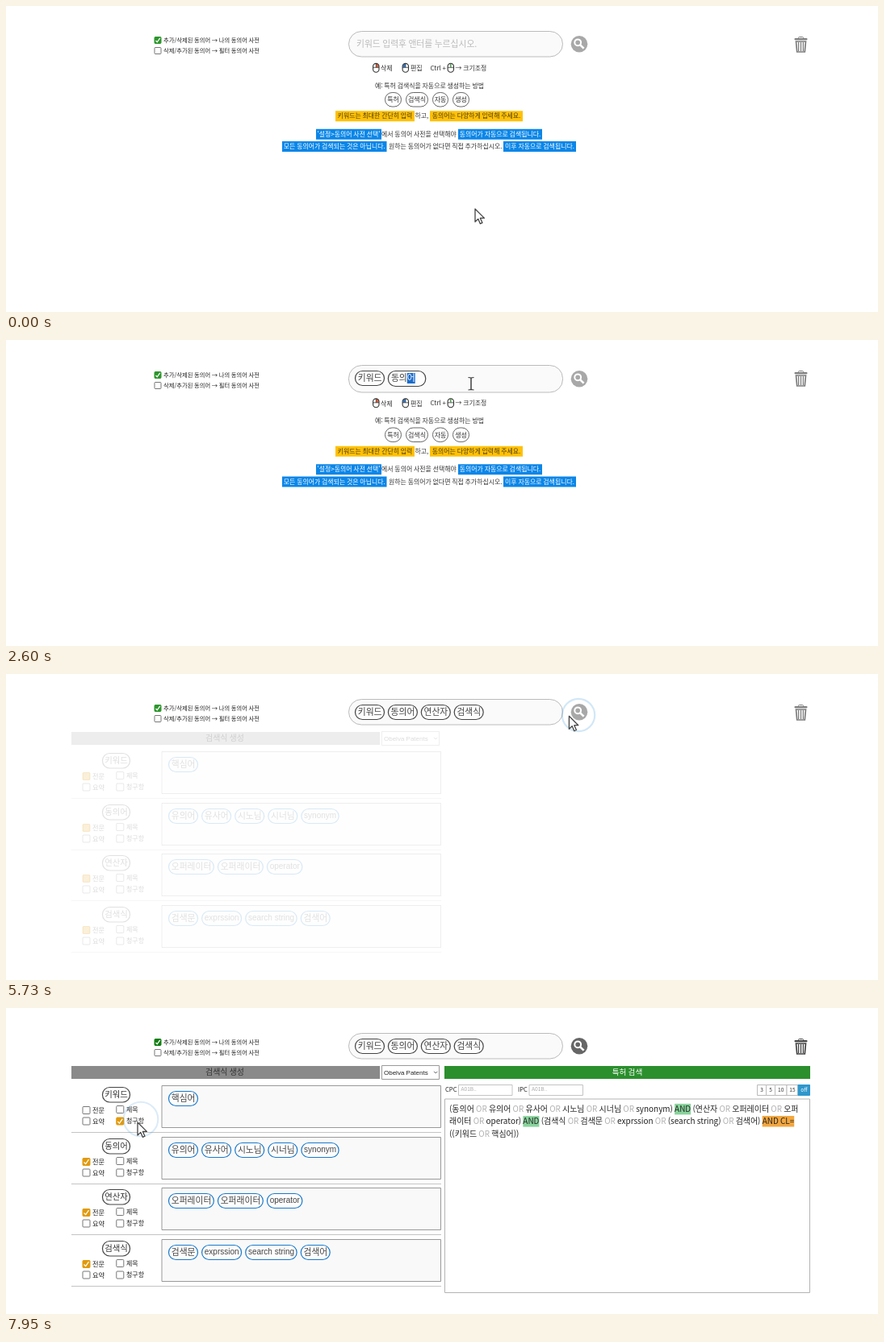
Write an HTML page with a canvas that moves like this. It is 1080 px wide and 380 px high and loops after 7990 ms.

```html
<!DOCTYPE html>
<html lang="ko">
<head>
<meta charset="utf-8">
<title>검색식 생성</title>
<style>
html, body { margin: 0; width: 100%; height: 100%; overflow: hidden; background: #fff; }
canvas { display: block; }
</style>
</head>
<body>
<canvas id="stage" width="1080" height="380"></canvas>
<script>
const ctx = document.getElementById('stage').getContext('2d');
const LOOP = 7990;
const SANS = '"Noto Sans CJK KR", "Noto Sans CJK", "Noto Sans CJK JP", "Noto Sans", sans-serif';
const ARIAL = '"Liberation Sans", "Noto Sans CJK KR", sans-serif';
const BLUE = '#0b86e8';

const PANEL_IN = 5560, RESULT_IN = 6450, FILTER_AT = 7660;

const ramp = (t, a, b) => Math.min(1, Math.max(0, (t - a) / (b - a)));
const ease = p => p * p * (3 - 2 * p);
const mix = (a, b, k) => 'rgb(' + a.map((v, i) => Math.round(v + (b[i] - v) * k)).join(',') + ')';

function setFont(size, family = SANS, weight = 400) {
  ctx.font = `${weight} ${size}px ${family}`;
}

// y is the visual middle of the line; returns the advance width
function text(s, x, y, size, color = '#333', { align = 'left', family = SANS, weight = 400 } = {}) {
  setFont(size, family, weight);
  ctx.textAlign = align;
  ctx.fillStyle = color;
  ctx.fillText(s, x, y + size * 0.37);
  return ctx.measureText(s).width;
}

function rect(x, y, w, h, fill, stroke, r = 0, line = 1) {
  ctx.beginPath();
  ctx.roundRect(x, y, w, h, r);
  if (fill) { ctx.fillStyle = fill; ctx.fill(); }
  if (stroke) { ctx.strokeStyle = stroke; ctx.lineWidth = line; ctx.stroke(); }
}

function lines(points, color, width, close) {
  ctx.beginPath();
  points.forEach(([x, y], i) => i ? ctx.lineTo(x, y) : ctx.moveTo(x, y));
  if (close) ctx.closePath();
  ctx.strokeStyle = color;
  ctx.lineWidth = width;
  ctx.stroke();
}

function checkbox(x, y, size, on) {
  rect(x + .5, y + .5, size - 1, size - 1, on || '#fff', on || '#777', 1);
  if (on) lines([[x + 2, y + size * .55], [x + size * .42, y + size * .76], [x + size * .8, y + size * .22]], '#fff', 1.3);
}

// ---- header ----

function searchIcon(x, y, color) {
  ctx.fillStyle = color;
  ctx.beginPath();
  ctx.arc(x, y, 10.3, 0, 7);
  ctx.fill();
  ctx.beginPath();
  ctx.arc(x - 1.8, y - 2, 3.9, 0, 7);
  ctx.strokeStyle = '#fff';
  ctx.lineWidth = 2;
  ctx.stroke();
  lines([[x + 1.2, y + 1], [x + 5.6, y + 5.4]], '#fff', 2.6);
}

function trash(color) {
  rect(976.5, 40, 16, 2.2, color, null, 1);
  rect(981.5, 38.5, 6, 2, null, color, 1, 1);
  lines([[978.5, 44], [979.7, 57], [989.3, 57], [990.5, 44]], color, 1.7, true);
  for (const x of [981.6, 984.5, 987.4]) lines([[x, 45], [x, 56]], color, 1.3);
}

const WORDS = [
  { text: '키워드', start: 1580, last: 2040, enter: 2120, steps: 'ㅋ 키 킹 키우 키워 키웓 키워드' },
  { text: '동의어', start: 2160, last: 2590, enter: 2680, steps: 'ㄷ 도 동 동ㅇ 동으 동의 동읭 동의어' },
  { text: '연산자', start: 2850, last: 3250, enter: 3320, steps: 'ㅇ 여 연 연ㅅ 연사 연산 연삱 연산자' },
  { text: '검색식', start: 3400, last: 3920, enter: 4040, steps: 'ㄱ 거 검 검ㅅ 검새 검색 검샋 검색시 검색식' }
];

function pill(s, x, y, border, latin) {
  const size = latin ? 10 : 10.8, family = latin ? ARIAL : SANS;
  setFont(size, family);
  const w = ctx.measureText(s).width + 7.2;
  rect(x + .5, y + .5, w - 1, 18, '#fdfdfd', border, 9, 1.2);
  text(s, x + 3.7, y + 8.6, size, '#444', { family });
  return w;
}

function composing(word, x, t) {
  const steps = word ? word.steps.split(' ') : [];
  const n = word ? Math.floor((t - word.start) / (word.last - word.start) * (steps.length - 1)) : -1;
  const s = n < 0 ? '' : steps[Math.min(n, steps.length - 1)];
  setFont(10.8);
  const full = ctx.measureText(s).width;
  rect(x + .5, 38.5, full + 16.5, 19, '#fdfdfd', '#444', 9, 1.2);
  if (s) {
    const done = s.slice(0, -1), dw = ctx.measureText(done).width;
    text(done, x + 4, 47, 10.8, '#444');
    rect(x + 4 + dw, 41, full - dw, 13, '#1a6ccc');
    text(s.slice(-1), x + 4 + dw, 47, 10.8, '#fff');
  } else if (Math.floor((t - 4040) / 300) % 2 === 0) {
    rect(x + 3.5, 41, 1, 13, '#999');
  }
}

function field(t, tall) {
  rect(424.5, 31.5, 265, tall ? 33.5 : 31.5, '#fafafa', '#bbb', 16);
  if (t < WORDS[0].start) {
    text('키워드 입력후 앤터를 누르십시오.', 434, 47, 10.8, '#bbb');
    if (t > 1040 && Math.floor((t - 1040) / 300) % 2 === 0) rect(435, 41, 1, 13, '#777');
    return;
  }
  let x = 432;
  for (const w of WORDS) {
    if (t < w.enter) break;
    x += pill(w.text, x, 38, '#444') + 3.9;
  }
  if (t < PANEL_IN) composing(WORDS.find(w => t < w.enter), x, t);
}

function header(t) {
  const tall = t >= WORDS[0].start && t < PANEL_IN;
  const d = tall ? 1 : 0, k = ramp(t, 6380, 6850);
  checkbox(183.5, 38 + d, 9, mix([44, 150, 44], [16, 126, 16], k));
  checkbox(183.5, 51 + d, 9);
  text('추가/삭제된 동의어 → 나의 동의어 사전', 195, 42 + d, 7.3, '#222');
  text('삭제/추가된 동의어 → 필터 동의어 사전', 195, 55.7 + d, 7.3, '#222');
  field(t, tall);
  const g = mix([168, 168, 168], [102, 102, 102], k);
  searchIcon(710, 47.3 + d, g);
  trash(mix([125, 125, 125], [68, 68, 68], k));
}

// ---- help text ----

function mouseIcon(x, y, side) {
  rect(x + .6, y + .6, 7.4, 10.8, '#fff', null, 3.7);
  if (side === 'right') rect(x + 4.3, y + 1, 3.4, 4.5, '#e2603c', null, [0, 3, 0, 0]);
  if (side === 'left') rect(x + 1, y + 1, 3.3, 4.5, '#2a7be0', null, [3, 0, 0, 0]);
  rect(x + .6, y + .6, 7.4, 10.8, null, '#333', 3.7, 1.1);
  lines([[x + .6, y + 5.5], [x + 8, y + 5.5]], '#333', .8);
  lines([[x + 4.3, y + .6], [x + 4.3, y + 5.5]], side ? '#333' : '#4a9a4a', side ? .8 : 1.4);
}

function mark(s, x, w, y, fill, color, weight) {
  rect(x, y - 6.5, w, 13, fill);
  text(s, x + w / 2, y - .2, 7.93, color, { align: 'center', weight });
}

function help(d) {
  ctx.save();
  ctx.translate(0, d);
  mouseIcon(454, 70.8, 'right');
  text('삭제', 464, 77.3, 8);
  mouseIcon(490.5, 70.8, 'left');
  text('편집', 501, 77.3, 8);
  text('Ctrl +', 525.5, 76.6, 8);
  mouseIcon(546.5, 70.8);
  text('→ 크기조정', 556.5, 76.6, 7.9);
  text('예: 특허 검색식을 자동으로 생성하는 방법', 524.5, 99, 7.93, '#333', { align: 'center' });
  for (const [s, x, w] of [['특허', 469, 21], ['검색식', 495, 28], ['자동', 528, 20], ['생성', 553, 21]]) {
    rect(x + .5, 107.5, w - 1, 17.5, '#fff', '#666', 8.7);
    text(s, x + w / 2, 116.3, 8, '#333', { align: 'center' });
  }
  const yellow = '#ffc107', dark = '#4a3a10';
  mark('키워드는 최대한 간단히 입력', 408, 98, 136.7, yellow, dark, 500);
  text('하고,', 506.5, 136.5, 7.93);
  mark('동의어는 다양하게 입력해 주세요.', 525, 115, 136.7, yellow, dark, 500);
  mark("'설정>동의어 사전 선택'", 384, 81, 159.2, BLUE, '#fff', 500);
  text('에서 동의어 사전을 선택해야', 465, 159, 7.93);
  mark('동의어가 자동으로 검색됩니다.', 560, 104, 159.2, BLUE, '#fff', 500);
  mark('모든 동의어가 검색되는 것은 아닙니다.', 342, 129.5, 174.5, BLUE, '#fff', 500);
  text('원하는 동의어가 없다면 직접 추가하십시오.', 474, 174.5, 7.93);
  mark('이후 자동으로 검색됩니다.', 616, 90, 174.5, BLUE, '#fff', 500);
  ctx.restore();
}

// ---- left panel ----

const GROUPS = [
  ['키워드', '핵심어'],
  ['동의어', '유의어', '유사어', '시노님', '시너님', 'synonym'],
  ['연산자', '오퍼레이터', '오퍼래이터', 'operator'],
  ['검색식', '검색문', 'exprssion', 'search string', '검색어']
];

function selectBox(hover) {
  rect(465.5, 71.5, 71, 17, '#fff', hover ? '#6aaedb' : '#999');
  if (hover) rect(527.5, 72, 8.5, 16, '#d6e9f5');
  text('Obelva Patents', 468, 79.7, 8, '#222', { family: ARIAL });
  lines([[530, 78.8], [532.2, 81], [534.4, 78.8]], '#555', .9);
}

function panel(t, hover) {
  ctx.globalAlpha = ramp(t, PANEL_IN, 6650);
  rect(81, 72, 382, 16, '#8a8a8a');
  text('검색식 생성', 271, 79.8, 9.95, '#333', { align: 'center' });
  selectBox(hover);
  GROUPS.forEach(([name, ...terms], i) => {
    const y = Math.round(i * 63.5);
    const claims = i === 0 && t >= FILTER_AT, amber = '#e29a0c';
    rect(119.5, 98.5 + y, 34, 18.5, '#fff', '#444', 9, 1.2);
    text(name, 136.5, 107.4 + y, 10.4, '#333', { align: 'center' });
    checkbox(94.5, 122 + y, 10, claims ? null : amber);
    checkbox(136.3, 121 + y, 10);
    checkbox(94.5, 135.5 + y, 10);
    checkbox(136.3, 135.5 + y, 10, claims ? amber : null);
    text('전문', 107, 127 + y, 8.2, '#222');
    text('제목', 149, 126 + y, 8, '#222');
    text('요약', 107, 140.5 + y, 8.2, '#222');
    text('청구항', 149, 140.5 + y, 8, '#222');
    rect(193, 96.5 + y, 345.5, 52, '#f9f9f9', '#999');
    let x = 201;
    for (const s of terms) x += pill(s, x, 103 + y, '#1879cc', s < '~') + 4.1;
    rect(81, 154 + y, 458, 1, '#c4c4c4');
  });
  ctx.globalAlpha = 1;
}

// ---- right panel ----

const QUERY = [
  '(키워드 OR 핵심어) AND (동의어 OR 유의어 OR 유사어 OR 시노님 OR 시너님 OR synonym) AND (연산자',
  'OR 오퍼레이터 OR 오퍼래이터 OR operator) AND (검색식 OR 검색문 OR exprssion OR (search string)',
  'OR 검색어)'
];
const FILTERED = [
  '(동의어 OR 유의어 OR 유사어 OR 시노님 OR 시너님 OR synonym) AND (연산자 OR 오퍼레이터 OR 오퍼',
  '래이터 OR operator) AND (검색식 OR 검색문 OR exprssion OR (search string) OR 검색어) AND CL=',
  '((키워드 OR 핵심어))'
];

function queryLine(s, y) {
  let x = 549;
  setFont(9.95);
  for (const part of s.split(/(AND CL=|AND|OR)/)) {
    setFont(9.95);
    const w = ctx.measureText(part).width;
    if (part.startsWith('AND')) rect(x, y - 6.7, w, 13.5, part === 'AND' ? '#88d49c' : '#f3a73f');
    x += text(part, x, y, 9.95, part === 'OR' ? '#b0b0b0' : '#222');
  }
}

function result(t) {
  ctx.globalAlpha = ramp(t, RESULT_IN, 7200);
  rect(543, 72, 453, 16, '#2b8f2d');
  text('특허 검색', 769.5, 79.5, 9.6, '#fff', { align: 'center' });
  for (const [s, x, box] of [['CPC', 544, 560.5], ['IPC', 634, 648]]) {
    text(s, x, 101.5, 7.6, '#222');
    rect(box, 95.5, 66.5, 13, '#fff', '#c4c4c4');
    text('A01B..', box + 3, 101, 6.6, '#aaa');
  }
  const edges = [930.5, 941.5, 952.5, 967, 981, 995.5];
  ['3', '5', '10', '15', 'off'].forEach((s, i) => {
    const x = edges[i], w = edges[i + 1] - x, on = s === 'off';
    rect(x, 95.5, w, 13, on ? '#2f97cc' : '#fff', on ? '#2f97cc' : '#bbb');
    text(s, x + w / 2, 102, 6.6, on ? '#fff' : '#333', { align: 'center' });
  });
  rect(543.5, 113, 452, 240.5, '#fff', '#b4b4b4');
  (t < FILTER_AT ? QUERY : FILTERED).forEach((s, i) => queryLine(s, 125.6 + i * 15.2));
  ctx.globalAlpha = 1;
}

// ---- pointer ----

const PATH = [
  [440, 581, 252], [960, 576, 54], [4850, 576, 54], [5330, 709, 51], [5640, 709, 51],
  [6320, 472, 78], [6440, 443, 78], [7000, 443, 78], [7550, 163, 142], [LOOP, 163, 142]
];
const CLICKS = [[985, 573, 53], [5440, 709, 51], [6480, 443, 79], [7640, 167, 138]];

function pointerAt(t) {
  const i = PATH.findIndex(p => t < p[0]);
  if (i < 1) return PATH[0].slice(1);
  const [t0, x0, y0] = PATH[i - 1], [t1, x1, y1] = PATH[i];
  const p = ease(ramp(t, t0, t1));
  return [x0 + (x1 - x0) * p, y0 + (y1 - y0) * p];
}

function ripple(t) {
  for (const [t0, x, y] of CLICKS) {
    const p = (t - t0) / 400;
    if (p < 0 || p > 1) continue;
    ctx.beginPath();
    ctx.arc(x, y, 4.2 + 22 * p, 0, 7);
    ctx.globalAlpha = p < .15 ? .95 : (1 - p) * .8;
    ctx.fillStyle = ctx.strokeStyle = '#2e90d8';
    ctx.lineWidth = 4 - 2.5 * p;
    if (p < .15) ctx.fill(); else ctx.stroke();
    ctx.globalAlpha = 1;
  }
}

function shape(d, x, y) {
  ctx.save();
  ctx.translate(x, y);
  const path = new Path2D(d);
  ctx.lineJoin = 'round';
  ctx.fillStyle = '#fff';
  ctx.fill(path);
  ctx.strokeStyle = '#444';
  ctx.lineWidth = 1.3;
  ctx.stroke(path);
  ctx.restore();
}

const ARROW = 'M0 0V16L3.8 12.4L6.4 18.4L9 17.2L6.4 11.4H11.4Z';
const HAND = 'M-2 1.5Q0-1.5 2 1.5V8.5Q4 7 5.4 9.2Q7.4 8 8.6 10Q10.8 9.4 11.2 11.5V16Q11 19 9 21V24H-1V21.5L-5.4 14.5Q-6.4 11.6-4 11.6L-2 13.8Z';

function pointer(x, y) {
  const inField = x > 426 && x < 688 && y > 31 && y < 65;
  const onSearch = Math.hypot(x - 710, y - 48) < 11;
  const onBar = x > 81 && x < 463 && y > 72 && y < 88;
  if (inField) {
    lines([[x - 3.5, y - 7.5], [x, y - 7], [x + 3.5, y - 7.5]], '#333', 1.2);
    lines([[x, y - 7], [x, y + 7.5]], '#333', 1.4);
    lines([[x - 3.5, y + 8], [x, y + 7.5], [x + 3.5, y + 8]], '#333', 1.2);
  } else {
    shape(onSearch || onBar ? HAND : ARROW, x, y);
  }
}

function draw(t) {
  ctx.fillStyle = '#fff';
  ctx.fillRect(0, 0, 1080, 380);
  const [x, y] = pointerAt(t);
  header(t);
  if (t < PANEL_IN) help(t < WORDS[0].start ? 0 : 1.5);
  else panel(t, x > 465 && x < 537 && y > 71 && y < 89);
  if (t > RESULT_IN) result(t);
  ripple(t);
  pointer(x, y);
}

const began = performance.now();
function tick() {
  draw((performance.now() - began) % LOOP);
  requestAnimationFrame(tick);
}
tick();
</script>
</body>
</html>
```
